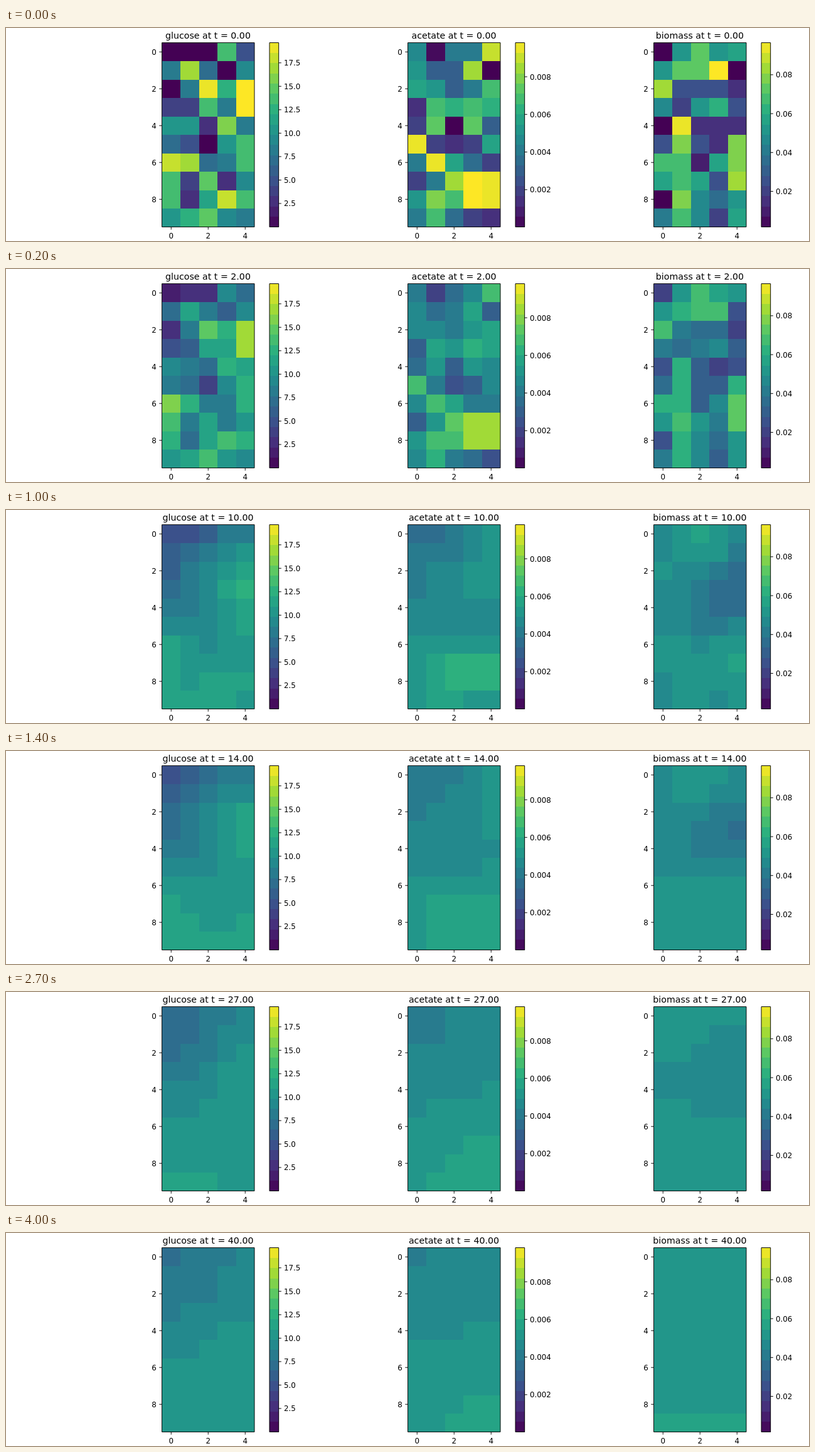
An HTML page that plays this animation: 1280 by 341 pixels, repeating every 4100 ms.

```html
<!DOCTYPE html>
<html lang="en">
<head>
<meta charset="utf-8">
<title>Diffusion on a grid</title>
<style>
  html, body { margin: 0; width: 100%; height: 100%; overflow: hidden; background: #fff; }
  svg { display: block; font: 11.85px "DejaVu Sans", sans-serif; }
  .title { font-size: 14.2px; text-anchor: middle; }
  .fill { shape-rendering: crispEdges; }
  .line { fill: none; stroke: #000; stroke-width: .95; }
</style>
</head>
<body>
<svg id="stage" width="1280" height="341" viewBox="0 0 1280 341"></svg>
<script>
const ROWS = 10, COLS = 5, CELL = 29.5, TOP = 23.5, HEIGHT = ROWS * CELL;
const STEP_MS = 100, STEPS = 41, DIFFUSION = 0.1, SUBSTEPS = 10, LEVELS = 18;

// Starting concentrations in percent of each colour scale, row by row.
const fields = [
  { name: 'glucose', x: 248.5, min: 0, max: 19.65, ticks: [2.5, 5, 7.5, 10, 12.5, 15, 17.5], digits: 1, growth: 0,
    start: [0, 0, 0, 72, 26,  40, 88, 36, 0, 47,  0, 41, 98, 66, 99,  20, 17, 72, 41, 100,  53, 53, 16, 83, 41,
            34, 27, 0, 53, 69,  94, 88, 34, 41, 72,  72, 22, 77, 16, 47,  72, 16, 60, 89, 72,  50, 66, 77, 46, 41] },
  { name: 'acetate', x: 640.5, min: 0.00002, max: 0.00981, ticks: [0.002, 0.004, 0.006, 0.008], digits: 3, growth: 0,
    start: [46, 2, 39, 39, 92,  52, 33, 33, 87, 0,  56, 52, 33, 40, 72,  12, 72, 64, 70, 64,  17, 76, 0, 76, 33,
            96, 20, 12, 20, 56,  40, 96, 58, 34, 22,  20, 40, 87, 100, 97,  52, 79, 72, 100, 97,  41, 72, 34, 22, 12] },
  { name: 'biomass', x: 1032.5, min: 0.0017, max: 0.0965, ticks: [0.02, 0.04, 0.06, 0.08], digits: 2, growth: 0.003,
    start: [0, 53, 77, 52, 59,  54, 73, 77, 100, 0,  86, 27, 27, 24, 12,  47, 17, 53, 65, 27,  0, 98, 12, 12, 15,
            27, 79, 27, 12, 79,  72, 72, 11, 59, 79,  59, 72, 59, 27, 86,  0, 82, 46, 34, 53,  41, 72, 47, 22, 59] }
];

const viridis = ['440154', '472c7a', '3b518b', '2c718e', '21908d', '27ad81', '5cc863', 'aadc32', 'fde725']
  .map(hex => [0, 2, 4].map(i => parseInt(hex.slice(i, i + 2), 16)));

function color(v) {
  const pos = v * (viridis.length - 1), i = Math.min(Math.floor(pos), viridis.length - 2);
  return `rgb(${viridis[i].map((c, k) => Math.round(c + (viridis[i + 1][k] - c) * (pos - i)))})`;
}

const bandColor = band => color((band + 0.5) / LEVELS);

function cellColor(v) {
  if (v < 0.012) return color(0);
  if (v > 0.982) return color(1);
  return bandColor(Math.floor(v * LEVELS));
}

// One small time step: exchange with the neighbours inside the grid, plus growth.
function advance(grid, { growth, min, max }) {
  const dt = 1 / SUBSTEPS, floor = min / (max - min);
  return grid.map((v, i) => {
    const r = Math.floor(i / COLS), c = i % COLS;
    let flow = 0;
    if (r > 0) flow += grid[i - COLS] - v;
    if (r < ROWS - 1) flow += grid[i + COLS] - v;
    if (c > 0) flow += grid[i - 1] - v;
    if (c < COLS - 1) flow += grid[i + 1] - v;
    return v + dt * (DIFFUSION * flow + growth * (v + floor));
  });
}

function simulate(field) {
  const states = [field.start.map(p => p / 100)];
  while (states.length < STEPS) {
    let grid = states[states.length - 1];
    for (let s = 0; s < SUBSTEPS; s++) grid = advance(grid, field);
    states.push(grid);
  }
  return states;
}

const stage = document.getElementById('stage');

function add(tag, attrs, text = '') {
  const el = document.createElementNS('http://www.w3.org/2000/svg', tag);
  for (const key in attrs) el.setAttribute(key, attrs[key]);
  el.textContent = text;
  return stage.appendChild(el);
}

function block(x0, y0, x1, y1, fill) {
  const [x, y, right, bottom] = [x0, y0, x1, y1].map(Math.round);
  return add('rect', { class: 'fill', x, y, width: right - x, height: bottom - y, fill });
}

const line = d => add('path', { class: 'line', d });
const label = (x, y, text, anchor) => add('text', { x, y, 'text-anchor': anchor }, text);

function build(field) {
  const { x, min, max } = field, bottom = TOP + HEIGHT, right = x + COLS * CELL, bar = x + 171.5;
  field.states = simulate(field);
  field.title = add('text', { class: 'title', x: x + 73.5, y: 16.8 });
  field.cells = field.start.map((_, i) => {
    const cx = x + (i % COLS) * CELL, cy = TOP + Math.floor(i / COLS) * CELL;
    return block(cx, cy, cx + CELL, cy + CELL);
  });
  for (let k = 0; k < LEVELS; k++) {
    const y = bottom - k * HEIGHT / LEVELS;
    block(bar, y - HEIGHT / LEVELS, bar + 15, y, bandColor(k));
  }
  line(`M${x} ${TOP}H${right}V${bottom}H${x}Z`);
  line(`M${bar} ${TOP}h14.7V${bottom}h-14.7Z`);

  for (let c = 0; c < COLS; c += 2) {
    const tx = x + (c + 0.5) * CELL;
    line(`M${tx} ${bottom}v4.2`);
    label(tx, 336.6, c, 'middle');
  }
  for (let r = 0; r < ROWS; r += 2) {
    const ty = TOP + (r + 0.5) * CELL;
    line(`M${x} ${ty}h-4.2`);
    label(x - 8.6, ty + 4.5, r, 'end');
  }
  for (const value of field.ticks) {
    const ty = bottom - (value - min) / (max - min) * HEIGHT;
    line(`M${bar + 14.7} ${ty}h4.2`);
    label(bar + 23, ty + 4.5, value.toFixed(field.digits), 'start');
  }
}

function show(step) {
  for (const { name, title, cells, states } of fields) {
    title.textContent = `${name} at t = ${step.toFixed(2)}`;
    cells.forEach((cell, i) => cell.setAttribute('fill', cellColor(states[step][i])));
  }
}

let shown = -1;
function tick() {
  const step = Math.floor(performance.now() / STEP_MS) % STEPS;
  if (step !== shown) show(shown = step);
  requestAnimationFrame(tick);
}

fields.forEach(build);
tick();
</script>
</body>
</html>
```
